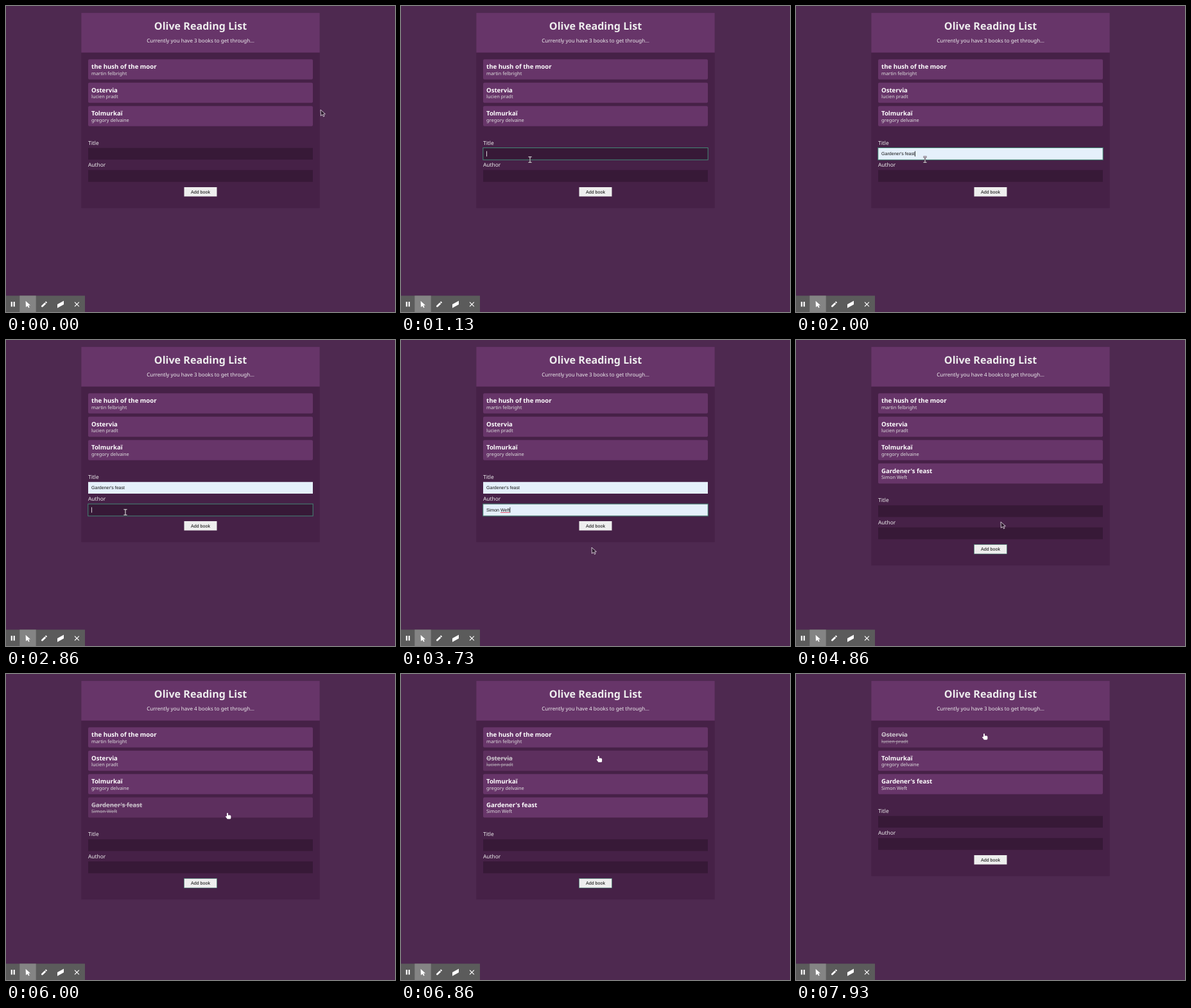
Recreate the animation shown at these times as an HTML page with a canvas. Size 606 by 478 pixels, loop 8000 ms.

```html
<!DOCTYPE html>
<html lang="en">
<head>
<meta charset="utf-8">
<title>Reading list</title>
<style>
  html, body { margin: 0; width: 100%; height: 100%; overflow: hidden; background: #4e2950; }
  canvas { display: block; width: 606px; height: 478px; }
</style>
</head>
<body>
<canvas id="stage"></canvas>
<script>
const W = 606, H = 478, LOOP = 8000;
const canvas = document.getElementById('stage');
const ctx = canvas.getContext('2d');
const dpr = window.devicePixelRatio || 1;
canvas.width = W * dpr;
canvas.height = H * dpr;

const SANS = '"Noto Sans", "Open Sans", sans-serif';
const FIELD_FONT = '7.07px "Liberation Sans", Arial, sans-serif';
const COLOR = {
  page: '#4e2950', panel: '#462147', card: '#673569', field: '#371937',
  filled: '#e5f0fb', focus: '#438674', text: '#eeeeee', author: '#dddddd'
};

const LEFT = 128, WIDTH = 350, INSET = 133, CENTER = 303;
const ROW_TOP = 83.2, ROW_STEP = 36.5, ROW_HEIGHT = 31.5, FIELD_HEIGHT = 18.4;

const BOOKS = [
  ['the hush of the moor', 'martin felbright'],
  ['Ostervia', 'lucien pradt'],
  ['Tolmurkaï', 'gregory delvaine'],
  ["Gardener's feast", 'Simon Weft']
];
const [NEW_TITLE, NEW_AUTHOR] = BOOKS[3];

// Each field gets focus, one typed letter, then the browser's completion.
const ADDED = 4400, REMOVED = 7700;
const TITLE = { label: 'Title', value: NEW_TITLE, focus: 960, key: 1660, fill: 1930, blur: 2600 };
const AUTHOR = { label: 'Author', value: NEW_AUTHOR, focus: 2600, key: 2930, fill: 3130, blur: ADDED, misspelt: true };

const POINTER_START = { x: 490, y: 162 };
const MOVES = [
  { from: 60, to: 930, x: 201, y: 240 },
  { from: 2130, to: 2600, x: 186, y: 269 },
  { from: 3460, to: 3730, x: 297, y: 324 },
  { from: 3730, to: 4260, x: 310, y: 290 },
  { from: 4460, to: 4860, x: 319, y: 284 },
  { from: 5000, to: 5260, x: 345, y: 217 },
  { from: 6000, to: 7200, x: 293, y: 93, steady: true }
];

const clamp = v => Math.min(1, Math.max(0, v));
const smooth = k => k * k * (3 - 2 * k);

function pointerAt(t) {
  return MOVES.reduce((p, m) => {
    const k = clamp((t - m.from) / (m.to - m.from));
    const e = m.steady ? k : smooth(k);
    return { x: p.x + (m.x - p.x) * e, y: p.y + (m.y - p.y) * e };
  }, POINTER_START);
}

function rect(x, y, w, h, color, radius = 0) {
  ctx.fillStyle = color;
  ctx.beginPath();
  ctx.roundRect(x, y, w, h, radius);
  ctx.fill();
}

function outline(x, y, w, h, width) {
  ctx.strokeStyle = COLOR.focus;
  ctx.lineWidth = width;
  ctx.strokeRect(x, y, w, h);
}

function text(str, x, y, font, color, align = 'left') {
  ctx.font = font;
  ctx.fillStyle = color;
  ctx.textAlign = align;
  ctx.fillText(str, x, y);
  return ctx.measureText(str).width;
}

function line(x0, y0, x1, y1, color, width) {
  ctx.strokeStyle = color;
  ctx.lineWidth = width;
  ctx.beginPath();
  ctx.moveTo(x0, y0);
  ctx.lineTo(x1, y1);
  ctx.stroke();
}

function at(x, y, angle, paint) {
  ctx.save();
  ctx.translate(x, y);
  ctx.rotate(angle);
  paint();
  ctx.restore();
}

// Pointer with its tip at the origin
function arrow(fill, stroke) {
  const outlinePoints = [[0, 0], [7.4, 6.7], [4.4, 7], [6.1, 10], [4.5, 10.8], [2.8, 7.6], [0.4, 9.6]];
  ctx.beginPath();
  outlinePoints.forEach(p => ctx.lineTo(...p));
  ctx.closePath();
  ctx.fillStyle = fill;
  ctx.fill();
  if (!stroke) return;
  ctx.strokeStyle = stroke;
  ctx.lineWidth = 0.8;
  ctx.stroke();
}

const CURSORS = {
  arrow: () => arrow('#2b1a2c', '#f0e8f0'),
  beam() {
    for (const [color, width] of [['#3a2a3a', 2.2], ['#d8d0d8', 1.1]]) {
      line(0, -4, 0, 4, color, width);
      for (const end of [-4.3, 4.3]) line(-2.6, end, 2.6, end, color, width);
    }
  },
  hand() {
    rect(-0.9, 0, 1.9, 7, '#ffffff', 0.9);
    rect(-1, 3.5, 6.4, 6.2, '#ffffff', 1.6);
    at(-2.4, 5.2, 0.85, () => rect(0, -0.7, 4, 1.7, '#ffffff', 0.8));
  }
};

function drawBook([title, author], y, hovered) {
  rect(LEFT, y, WIDTH, ROW_HEIGHT, COLOR.card, 2);
  const titleWidth = text(title, INSET, y + 15, `bold 9.63px ${SANS}`, '#ffffff');
  const authorWidth = text(author, INSET, y + 24.3, `7.43px ${SANS}`, COLOR.author);
  if (!hovered) return;
  line(INSET, y + 12.2, INSET + titleWidth, y + 12.2, COLOR.text, 0.9);
  line(INSET, y + 22.2, INSET + authorWidth, y + 22.2, COLOR.text, 0.7);
  ctx.globalAlpha = 0.3;
  rect(LEFT, y, WIDTH, ROW_HEIGHT, COLOR.panel, 2);
  ctx.globalAlpha = 1;
}

function drawField(field, y, t) {
  const filled = t >= field.fill && t < ADDED;
  const focused = t >= field.focus && t < field.blur;
  const value = filled ? field.value : t >= field.key && t < ADDED ? field.value[0] : '';
  const blinkStart = t < field.key ? field.focus : field.fill + 330;
  const caret = focused && (t < blinkStart || (t - blinkStart) % 1000 < 500);
  const ink = filled ? '#111111' : '#ffffff';

  text(field.label, LEFT, y - 4.9, `8.4px ${SANS}`, COLOR.text);
  rect(LEFT, y, WIDTH, FIELD_HEIGHT, filled ? COLOR.filled : COLOR.field);
  if (focused) outline(LEFT - 0.2, y - 0.2, WIDTH + 0.4, FIELD_HEIGHT + 0.4, 1);
  const end = INSET + text(value, INSET, y + 11.7, FIELD_FONT, ink);
  if (filled && focused && field.misspelt) {
    const lastWord = value.split(' ').pop();
    line(end - ctx.measureText(lastWord).width, y + 13.2, end, y + 13.2, '#e0405c', 0.9);
  }
  if (caret) line(end + 0.5, y + 5, end + 0.5, y + 13.4, ink, 0.8);
}

function drawToolbar() {
  const white = '#ffffff', middle = 466;
  rect(0, 452.5, 123, 25.5, '#5b5b5b');
  rect(21.3, 452.5, 25.4, 25.5, '#848484');
  for (const x of [7.7, 11.6]) rect(x, middle - 4, 2.2, 7.6, white);
  at(30.6, 460.8, 0, () => arrow(white));
  at(59.5, middle, -Math.PI / 4, () => {
    rect(-5.8, -1.4, 8.4, 2.8, white, [2, 0, 0, 2]);
    rect(3.4, -1.4, 1.9, 2.8, white, 0.4);
  });
  at(85, middle, 0, () => {
    ctx.transform(1, -0.55, 0, 1, 0, 0);
    rect(-5, -2.7, 10, 5.6, white);
  });
  for (const s of [-3.4, 3.4]) line(110.4 - s, middle - 3.4, 110.4 + s, middle + 3.4, white, 1.2);
}

function draw(t) {
  const books = t < ADDED ? BOOKS.slice(0, 3) : t < REMOVED ? BOOKS : BOOKS.slice(1);
  const shift = (books.length - 3) * ROW_STEP;
  const titleY = 221.7 + shift, authorY = 256.3 + shift, buttonY = 283 + shift;
  const { x, y } = pointerAt(t);
  const over = (top, height) => x >= LEFT && x <= LEFT + WIDTH && y >= top && y <= top + height;

  ctx.setTransform(dpr, 0, 0, dpr, 0, 0);
  ctx.textRendering = 'geometricPrecision';
  rect(0, 0, W, H, COLOR.page);
  rect(117.3, 10.7, 371.4, 305.1 + shift, COLOR.panel);
  rect(117.3, 10.7, 371.4, 62, COLOR.card);
  text('Olive Reading List', CENTER, 37, `bold 16.1px ${SANS}`, COLOR.text, 'center');
  text(`Currently you have ${books.length} books to get through...`, CENTER, 57.2, `8.1px ${SANS}`, COLOR.text, 'center');

  let cursor = 'arrow';
  books.forEach((book, i) => {
    const top = ROW_TOP + i * ROW_STEP, hovered = over(top, ROW_HEIGHT);
    if (hovered) cursor = 'hand';
    drawBook(book, top, hovered);
  });

  drawField(TITLE, titleY, t);
  drawField(AUTHOR, authorY, t);
  if (over(titleY, FIELD_HEIGHT) || over(authorY, FIELD_HEIGHT)) cursor = 'beam';

  rect(277.5, buttonY, 51, 14.4, COLOR.text);
  if (t >= ADDED && t < REMOVED) outline(277.3, buttonY - 0.2, 51.4, 14.8, 0.6);
  text('Add book', CENTER, buttonY + 9.8, FIELD_FONT, '#000000', 'center');

  drawToolbar();
  at(x, y, 0, CURSORS[cursor]);
}

const start = performance.now();
function tick() {
  draw((performance.now() - start) % LOOP);
  requestAnimationFrame(tick);
}
tick();
</script>
</body>
</html>
```
